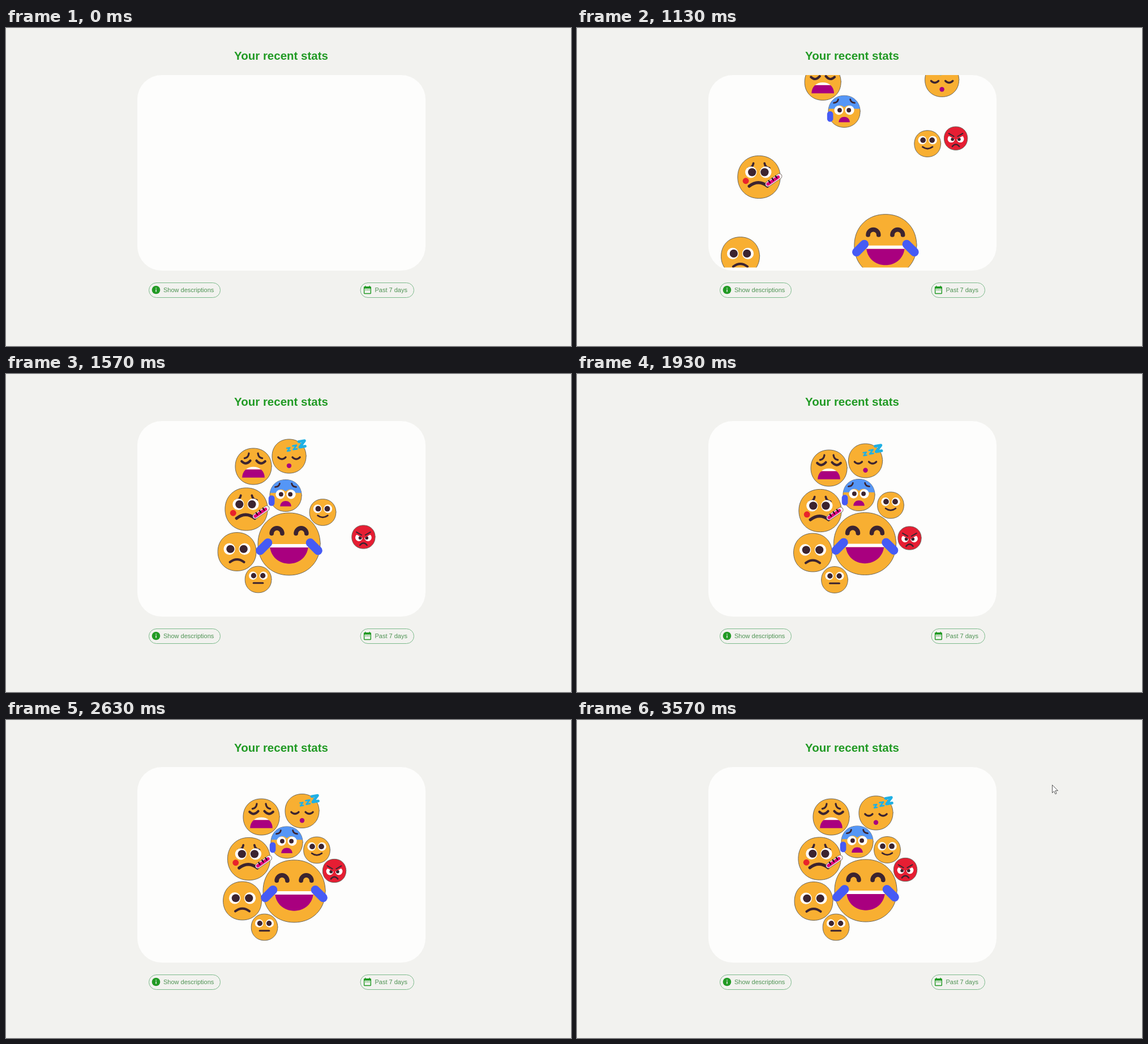
Animation, 998 px wide and 561 px high, one loop 3610 ms. Source, as an HTML page with a canvas:

```html
<!DOCTYPE html>
<html lang="en">
<head>
<meta charset="utf-8">
<title>Your recent stats</title>
<style>
  html, body { margin: 0; width: 100%; height: 100%; overflow: hidden; background: #f2f2ef; }
  canvas { display: block; }
</style>
</head>
<body>
<canvas id="stage" width="998" height="561"></canvas>
<script>
const ctx = document.getElementById('stage').getContext('2d');
const LOOP = 3610;
const CENTER = [495, 255];
const PULL = 400;
const KEYS = [1130, 1570, 1930, 2630, 3570];
const FONT = '"Liberation Sans", Arial, sans-serif';
const C = {
  page: '#f2f2ef', card: '#fdfdfc', green: '#219a24', label: '#4f9354', border: '#7cba8b',
  skin: '#f8af32', dark: '#3c2430', purple: '#a9007f', hand: '#465bf5', sky: '#5596f6',
  red: '#e61e33', pink: '#e0007c', cyan: '#1fb0e4', edge: '#68645a'
};

// Drawing helpers; faces use a unit radius.
function disc(x, y, r, color) {
  ctx.fillStyle = color;
  ctx.beginPath();
  ctx.arc(x, y, r, 0, Math.PI * 2);
  ctx.fill();
}

function strokePath(width, color = C.dark) {
  ctx.lineWidth = width;
  ctx.lineCap = ctx.lineJoin = 'round';
  ctx.strokeStyle = color;
  ctx.stroke();
}

function line(points, width, color) {
  ctx.beginPath();
  points.forEach(([x, y]) => ctx.lineTo(x, y));
  strokePath(width, color);
}

// Curve from (x0,y0) to (x1,y1) whose middle reaches height `apex`.
function bow(x0, y0, x1, y1, apex, width) {
  ctx.beginPath();
  ctx.moveTo(x0, y0);
  ctx.quadraticCurveTo((x0 + x1) / 2, (apex * 4 - y0 - y1) / 2, x1, y1);
  strokePath(width);
}

function worriedBrow(x0, y0, x1, y1) {
  ctx.beginPath();
  ctx.moveTo(x0, y0);
  ctx.quadraticCurveTo(x1 - 0.03, y0 - 0.03, x1, y1);
  strokePath(0.1);
}

function mirrored(draw) {
  draw();
  ctx.save();
  ctx.scale(-1, 1);
  draw();
  ctx.restore();
}

// Pupils sit a little closer together than the whites.
function eyes(dx, y, white, pupil, shift = 0) {
  for (const x of [-dx - 0.05, dx + 0.05]) disc(shift + x, y, white, '#fff');
  for (const x of [-dx, dx]) disc(shift + x, y, pupil, C.dark);
}

function headPath() {
  ctx.beginPath();
  for (let i = 0; i < 72; i++) {
    const a = i * Math.PI / 36, c = Math.cos(a), s = Math.sin(a);
    ctx.lineTo(Math.sign(c) * Math.abs(c) ** 0.95, Math.sign(s) * Math.abs(s) ** 0.95);
  }
  ctx.closePath();
}

// Fills the current path with teeth above `gum` and purple below.
function openMouth(gum) {
  ctx.save();
  ctx.clip();
  ctx.fillStyle = '#fff';
  ctx.fillRect(-1, -1, 2, 1 + gum);
  ctx.fillStyle = C.purple;
  ctx.fillRect(-1, gum, 2, 1);
  ctx.restore();
}

function zed(x, y, size, width) {
  const w = size / 2;
  line([[x - w, y - w * 0.7], [x + w * 0.8, y - w], [x - w * 0.7, y + w], [x + w, y + w * 0.7]], width, C.cyan);
}

const features = {
  weary() {
    mirrored(() => {
      worriedBrow(-0.49, -0.45, -0.25, -0.72);
      bow(-0.65, -0.28, -0.17, -0.32, -0.17, 0.13);
    });
    ctx.beginPath();
    ctx.moveTo(-0.62, 0.62);
    ctx.bezierCurveTo(-0.62, 0.25, -0.35, 0.02, 0, 0.02);
    ctx.bezierCurveTo(0.35, 0.02, 0.62, 0.25, 0.62, 0.62);
    openMouth(0.17);
  },
  sleepy() {
    mirrored(() => bow(-0.64, 0.06, -0.2, 0.06, 0.17, 0.11));
    disc(0, 0.56, 0.14, C.purple);
    zed(-0.03, -0.4, 0.2, 0.08);
    zed(0.34, -0.52, 0.25, 0.09);
    zed(0.76, -0.72, 0.38, 0.16);
  },
  anxious() {
    ctx.save();
    headPath();
    ctx.clip();
    ctx.fillStyle = C.sky;
    ctx.beginPath();
    ctx.moveTo(-1, -1);
    ctx.lineTo(-1, -0.17);
    ctx.lineTo(-0.62, -0.17);
    ctx.quadraticCurveTo(-0.36, -0.55, 0, -0.27);
    ctx.quadraticCurveTo(0.36, -0.55, 0.62, -0.17);
    ctx.lineTo(1, -0.17);
    ctx.lineTo(1, -1);
    ctx.fill();
    ctx.restore();
    mirrored(() => worriedBrow(-0.66, -0.54, -0.38, -0.76));
    eyes(0.29, -0.08, 0.29, 0.14);
    ctx.fillStyle = C.purple;
    ctx.beginPath();
    ctx.moveTo(-0.35, 0.68);
    ctx.bezierCurveTo(-0.35, 0.22, 0.35, 0.22, 0.35, 0.68);
    ctx.fill();
    line([[-0.89, 0.17], [-0.89, 0.46]], 0.38, C.hand);
  },
  smile() {
    eyes(0.345, -0.27, 0.32, 0.21);
    bow(-0.38, 0.24, 0.38, 0.24, 0.38, 0.12);
  },
  angry() {
    mirrored(() => {
      disc(-0.39, 0.05, 0.31, '#fff');
      disc(-0.28, 0.08, 0.14, C.dark);
      line([[-0.62, -0.3], [-0.08, 0]], 0.14, C.red);
      line([[-0.6, -0.42], [-0.16, -0.16]], 0.1);
    });
    bow(-0.3, 0.7, 0.3, 0.7, 0.52, 0.12);
  },
  sick() {
    mirrored(() => worriedBrow(-0.49, -0.42, -0.26, -0.65));
    eyes(0.295, -0.23, 0.27, 0.19, -0.03);
    disc(-0.62, 0.18, 0.145, '#e9232b');
    bow(-0.46, 0.43, 0.4, 0.43, 0.26, 0.14);
    line([[0.42, 0.33], [0.96, -0.04]], 0.26, C.edge);
    line([[0.42, 0.33], [0.96, -0.04]], 0.22, '#f8eef2');
    line([[0.42, 0.33], [0.9, 0]], 0.15, C.pink);
    for (let i = 0; i < 3; i++) {
      const x = 0.46 + i * 0.16, y = 0.17 - i * 0.11;
      line([[x, y], [x + 0.06, y + 0.09]], 0.06, '#21151b');
    }
  },
  sad() {
    eyes(0.345, -0.14, 0.3, 0.21);
    bow(-0.37, 0.54, 0.37, 0.54, 0.4, 0.12);
  },
  neutral() {
    eyes(0.35, -0.29, 0.31, 0.2);
    line([[-0.36, 0.27], [0.36, 0.27]], 0.13);
  },
  joy() {
    for (const x of [-0.39, 0.39]) {
      ctx.beginPath();
      ctx.arc(x, -0.34, 0.17, Math.PI, Math.PI * 2);
      strokePath(0.14);
    }
    ctx.beginPath();
    ctx.moveTo(-0.62, 0);
    ctx.bezierCurveTo(-0.62, 0.84, 0.62, 0.84, 0.62, 0);
    openMouth(0.11);
    mirrored(() => line([[-0.93, 0.21], [-0.68, -0.04]], 0.28, C.hand));
  }
};

// Positions at the moments in KEYS.
const faces = [
  { kind: 'weary', r: 32, x: [434, 437, 445, 451, 449], y: [95, 163, 166, 171, 171] },
  { kind: 'sleepy', r: 30, x: [645, 500, 509.5, 523, 528], y: [91, 145, 153, 160.5, 164] },
  { kind: 'anxious', r: 28, x: [472, 494, 498, 496, 495], y: [147, 214.5, 213.5, 216, 215] },
  { kind: 'smile', r: 23.3, x: [619.5, 559.5, 554, 549, 548], y: [204, 244, 231.5, 229.5, 229] },
  { kind: 'angry', r: 20.6, x: [669.5, 631.5, 587.5, 580, 580], y: [194.5, 287.5, 289.5, 266, 264] },
  { kind: 'sick', r: 37.6, x: [321, 424.5, 429.5, 429, 428.5], y: [263, 238.5, 241, 245, 244.5] },
  { kind: 'sad', r: 33.9, x: [288, 408, 416.5, 417.5, 418], y: [403, 313.5, 315, 319, 319.5] },
  { kind: 'neutral', r: 23.3, x: [415, 445.5, 455, 456.5, 457.5], y: [470, 362.5, 363, 365.5, 365.5] },
  { kind: 'joy', r: 55, x: [545, 500, 508.5, 509, 510], y: [384, 300, 299.5, 302, 301] }
];

// Exponential pull towards the centre, then a monotone cubic through the keys.
function glide(p, center, t) {
  if (t < KEYS[0]) return center + (p[0] - center) * Math.exp((KEYS[0] - t) / PULL);
  const last = KEYS.length - 1;
  if (t >= KEYS[last]) return p[last];
  const slope = i => (p[i + 1] - p[i]) / (KEYS[i + 1] - KEYS[i]);
  const speed = i => {
    if (i === 0) return (center - p[0]) / PULL;
    if (i === last) return 0;
    const a = slope(i - 1), b = slope(i);
    return a * b > 0 ? 2 * a * b / (a + b) : 0;
  };
  const i = KEYS.findIndex((k, n) => t < KEYS[n + 1]);
  const span = KEYS[i + 1] - KEYS[i], u = (t - KEYS[i]) / span, v = 1 - u;
  return p[i] * v * v * (1 + 2 * u) + p[i + 1] * u * u * (3 - 2 * u)
    + span * u * v * (v * speed(i) - u * speed(i + 1));
}

function drawFace({ kind, r, x, y }, t) {
  ctx.save();
  ctx.translate(glide(x, CENTER[0], t), glide(y, CENTER[1], t));
  ctx.scale(r, r);
  headPath();
  ctx.fillStyle = kind === 'angry' ? C.red : C.skin;
  ctx.fill();
  strokePath(1 / r, C.edge);
  features[kind]();
  ctx.restore();
}

function text(str, x, y, font, color, align = 'left') {
  ctx.font = `${font} ${FONT}`;
  ctx.fillStyle = color;
  ctx.textAlign = align;
  ctx.fillText(str, x, y);
}

function pill(x, width, label) {
  ctx.beginPath();
  ctx.roundRect(x + 0.5, 449.5, width, 26, 13);
  strokePath(1, C.border);
  text(label, x + 26, 466, '11px', C.label);
}

const calendar = new Path2D('M9 11H7v2h2v-2zm4 0h-2v2h2v-2zm4 0h-2v2h2v-2zm2-7h-1V2h-2v2H8V2H6v2H5c-1.1 0-2 .9-2 2v14c0 1.1.9 2 2 2h14c1.1 0 2-.9 2-2V6c0-1.1-.9-2-2-2zm0 16H5V9h14v11z');
const arrow = new Path2D('M0 0V13.5L3.2 10.6L5.4 15.6L7.6 14.6L5.4 9.7H9.6Z');

function drawPage() {
  ctx.fillStyle = C.page;
  ctx.fillRect(0, 0, 998, 561);
  text('Your recent stats', 486, 56, 'bold 20.5px', C.green, 'center');
  ctx.fillStyle = C.card;
  ctx.beginPath();
  ctx.roundRect(232, 83, 509, 345, 43);
  ctx.fill();

  pill(252, 126, 'Show descriptions');
  disc(265, 462, 7.3, C.green);
  ctx.fillStyle = C.page;
  ctx.fillRect(264.3, 458.3, 1.5, 1.5);
  ctx.fillRect(264.3, 461.2, 1.5, 4.4);

  pill(625.5, 94.5, 'Past 7 days');
  ctx.save();
  ctx.translate(629.7, 453.2);
  ctx.scale(0.73, 0.73);
  ctx.fillStyle = C.green;
  ctx.fill(calendar);
  ctx.restore();
}

function drawCursor(t) {
  const u = Math.min(1, (t - 3380) / 180);
  if (u < 0) return;
  const rest = (1 - u) ** 2;
  ctx.save();
  ctx.translate(839.5 + 2 * rest, 115 - 132 * rest);
  ctx.fillStyle = '#fff';
  ctx.fill(arrow);
  ctx.lineWidth = 0.9;
  ctx.strokeStyle = '#444';
  ctx.stroke(arrow);
  ctx.restore();
}

function render(t) {
  drawPage();
  if (t > 670) {
    ctx.save();
    ctx.beginPath();
    ctx.rect(232, 83, 509, 339.5);
    ctx.clip();
    faces.forEach(face => drawFace(face, t));
    ctx.restore();
  }
  drawCursor(t);
}

const start = performance.now();
function tick() {
  render((performance.now() - start) % LOOP);
  requestAnimationFrame(tick);
}
tick();
</script>
</body>
</html>
```
